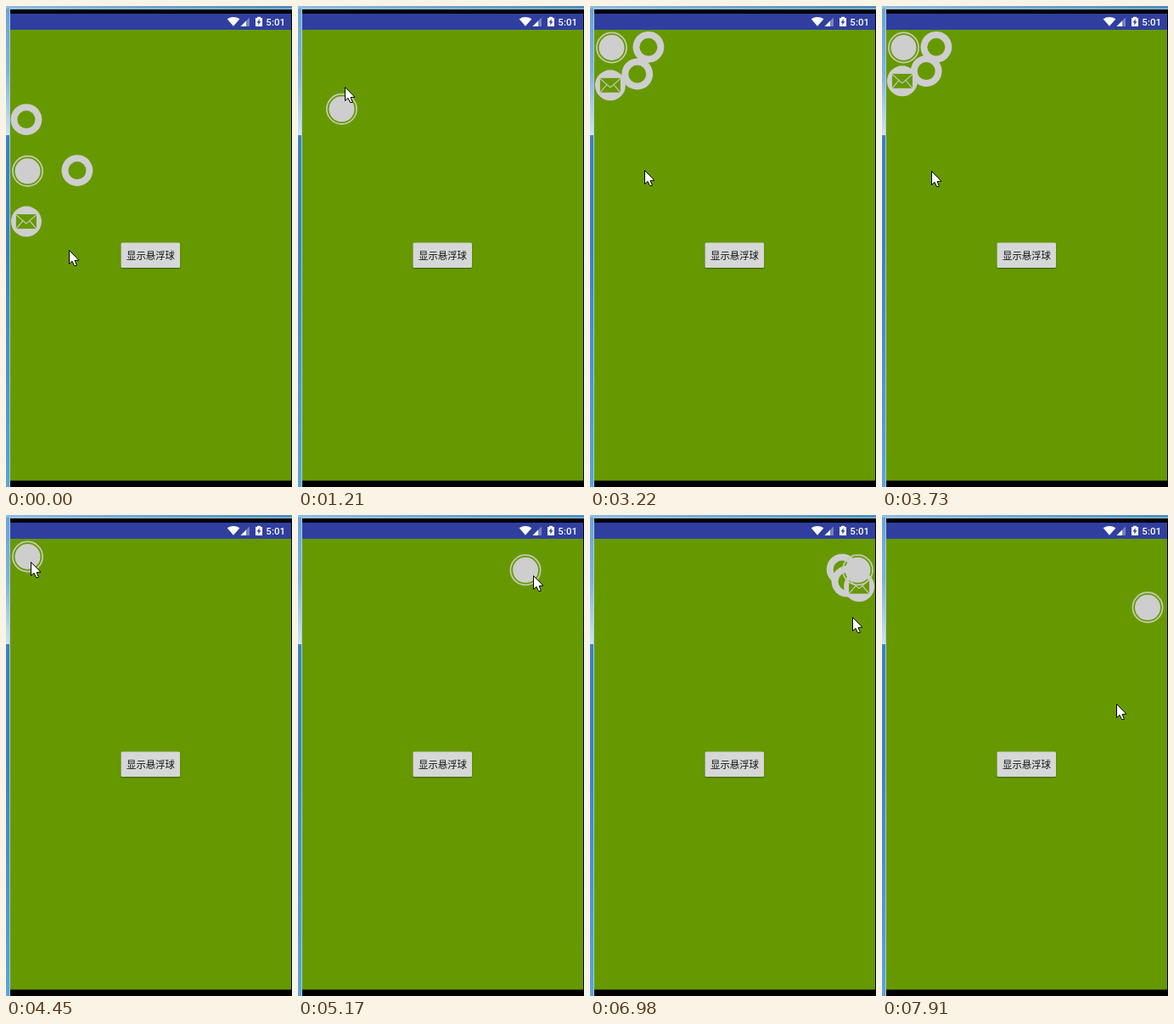
Recreate the animation shown at these times as an HTML page with a canvas. Size 337 px wide and 566 px high, loop 8 s.

```html
<!DOCTYPE html>
<html lang="zh">
<head>
<meta charset="utf-8">
<title>Floating ball</title>
<style>
  html, body { margin: 0; width: 100%; height: 100%; overflow: hidden; background: #000; }
  canvas { display: block; width: 337px; height: 566px; }
</style>
</head>
<body>
<canvas id="stage"></canvas>
<script>
const W = 337, H = 566, LOOP = 8000;
const BEAT = 134; // ms per screen refresh; all motion is counted in beats
const GREEN = '#669900', GREY = '#cecece', BLUE = '#303f9f';
const EDGES = [25.5, 315.5], TOP = 49, HOME_Y = 194.3;

const canvas = document.getElementById('stage');
const dpr = window.devicePixelRatio || 1;
canvas.width = Math.round(W * dpr);
canvas.height = Math.round(H * dpr);
const c = canvas.getContext('2d');

// Where the hand goes: [beat, x, y], straight in between.
const hand = [
  [0, 74, 287], [1, 74, 287], [5, 30, 193], [8, 56, 120], [9, 55, 95],
  [14, 54, 41], [15, 47, 33], [21, 34, 58], [24, 64, 193], [26, 63, 231],
  [29, 48, 119], [33, 29, 55], [36, 266, 71], [45, 316, 69], [46, 316, 69],
  [49, 290, 241], [53, 315, 80], [55, 315, 80], [58, 312.5, 124], [59, 276, 222]
];
const drags = [[5, 15], [33, 38], [55, 60]];  // [grab, drop]
const menus = [[-9, 1], [21, 26], [46, 50]];  // [open, close]

const clamp = v => Math.min(1, Math.max(0, v));
const mix = (a, b, u) => a + (b - a) * u;

function cursorAt(beat) {
  const i = hand.findIndex(k => k[0] > beat);
  if (i < 0) return hand[hand.length - 1].slice(1);
  const [t0, x0, y0] = hand[i - 1], [t1, x1, y1] = hand[i];
  const u = (beat - t0) / (t1 - t0);
  return [mix(x0, x1, u), mix(y0, y1, u)];
}

// A dragged ball trails the cursor by one beat; once dropped it slides to the nearer edge.
function ballAt(beat) {
  let x = EDGES[0], y = HOME_Y;
  for (const [grab, drop] of drags) {
    if (beat <= grab) break;
    const [x0, y0] = cursorAt(grab), [x1, y1] = cursorAt(Math.min(beat, drop) - 1);
    x += x1 - x0;
    y += y1 - y0;
    const u = clamp((beat - drop) / 3);
    x = mix(x, EDGES[x < W / 2 ? 0 : 1], u);
    y = mix(y, Math.max(TOP, y), u);
  }
  return [x, y];
}

// 0 is closed, 1 fully open: four beats to open, three to close.
function menuAt(beat) {
  return Math.max(...menus.map(([a, b]) => clamp(Math.min((beat - a) / 4, 1 - (beat - b) / 3))));
}

function rect(x, y, w, h, fill) {
  c.fillStyle = fill;
  c.fillRect(x, y, w, h);
}

function disc(x, y, r, fill) {
  c.fillStyle = fill;
  c.beginPath();
  c.arc(x, y, r, 0, Math.PI * 2);
  c.fill();
}

function poly(points, fill) {
  c.beginPath();
  points.forEach(([x, y]) => c.lineTo(x, y));
  c.closePath();
  c.fillStyle = fill;
  c.fill();
}

function fade(x, y, ...colors) {
  const g = c.createLinearGradient(0, 0, x, y);
  colors.forEach((color, i) => g.addColorStop(i / (colors.length - 1), color));
  return g;
}

function text(str, x, y, font, color, align) {
  c.font = font;
  c.fillStyle = color;
  c.textAlign = align;
  c.fillText(str, x, y);
}

function drawDesktop() {
  rect(0, 0, W, H, '#000');
  rect(0, 0, W, 3, fade(W, 0, '#8fbfe2', '#6ea6cf', '#4f8fc0'));
  rect(0, 3, 4, 149, fade(0, 152, '#6aa3d3', '#80b1da', '#cfe3f2'));
  rect(0, 152, 4, H, fade(0, H, '#3c82bd', '#3c82bd', '#5aa5d8'));
  rect(4, 3, W, 1, '#a9cbe4');
  rect(4, 3, 1, H, '#a9cbe4');
}

function drawStatusBar() {
  rect(5, 9, 331, 19, BLUE);
  c.beginPath();
  c.moveTo(268, 23.8);
  c.lineTo(260.6, 15.2);
  c.quadraticCurveTo(268, 10.6, 275.4, 15.2);
  c.fillStyle = '#fff';
  c.fill();
  poly([[276.5, 24], [287, 24], [287, 13.5]], 'rgba(255,255,255,.35)');
  poly([[276.5, 24], [283, 24], [283, 17.5]], '#fff');
  rect(294, 14, 8, 10, '#fff');
  rect(296, 12.8, 4, 1.4, '#fff');
  poly([[298.8, 15], [295.6, 19.6], [297.5, 19.6], [297.2, 22.8], [300.4, 18.2], [298.5, 18.2]], BLUE);
  text('5:01', 329, 23, '500 11.5px Roboto, sans-serif', '#fff', 'right');
}

function drawButton() {
  c.save();
  c.shadowColor = 'rgba(0,0,0,.4)';
  c.shadowBlur = 1.5 * dpr;
  c.shadowOffsetY = dpr;
  c.fillStyle = '#d6d7d7';
  c.beginPath();
  c.roundRect(135.5, 278.5, 69.5, 29.5, 1.5);
  c.fill();
  c.restore();
  text('显示悬浮球', 170.5, 298, '11.4px "Noto Sans CJK SC", "Noto Sans CJK", sans-serif', '#111', 'center');
}

function drawBadge(x, y) {
  disc(x, y, 18.4, GREY);
  disc(x, y, 10.5, GREEN);
}

function drawMail(x, y) {
  disc(x, y, 18, GREY);
  rect(x - 12, y - 8.5, 24, 17, GREEN);
  c.strokeStyle = GREY;
  c.lineWidth = 1.1;
  c.beginPath();
  for (const s of [-1, 1]) {
    c.moveTo(x + 12 * s, y - 8);
    c.lineTo(x, y + 2.5);
    c.moveTo(x + 12 * s, y + 8.5);
    c.lineTo(x + 4 * s, y - .8);
  }
  c.stroke();
}

// Near the top the fan opens sideways and down, elsewhere all around the ball.
function drawMenu(x, y, open) {
  if (!open) return;
  const side = x < W / 2 ? 1 : -1;
  const [from, step] = y < 100 ? [0, 45] : [-90, 90];
  [drawBadge, drawBadge, drawMail].forEach((icon, i) => {
    const a = (from + i * step) * Math.PI / 180, r = 60 * open;
    icon(x + side * (r * Math.cos(a) - 1.6), y + r * Math.sin(a) - .7);
  });
}

function drawBall(x, y) {
  c.strokeStyle = '#c6cbb4';
  c.lineWidth = 1.7;
  c.beginPath();
  c.arc(x, y, 17.6, 0, Math.PI * 2);
  c.stroke();
  disc(x, y, 15, GREY);
}

function drawCursor(x, y) {
  const shape = [[0, 0], [0, 16], [3.5, 12.8], [6, 18], [8.6, 18], [8.6, 17], [6.6, 12], [11.4, 11.6]];
  poly(shape.map(([px, py]) => [Math.round(x) + .5 + px, Math.round(y) + .5 + py]), '#fff');
  c.strokeStyle = '#000';
  c.lineWidth = 1;
  c.stroke();
}

function draw(time) {
  const beat = Math.floor(time / BEAT);
  const [bx, by] = ballAt(beat);
  c.setTransform(dpr, 0, 0, dpr, 0, 0);
  drawDesktop();
  drawStatusBar();
  rect(5, 28, 331, 530.5, GREEN);
  drawButton();
  drawMenu(bx, by, menuAt(beat));
  drawBall(bx, by);
  drawCursor(...cursorAt(beat));
}

function loop() {
  draw(performance.now() % LOOP);
  requestAnimationFrame(loop);
}
loop();
</script>
</body>
</html>
```
